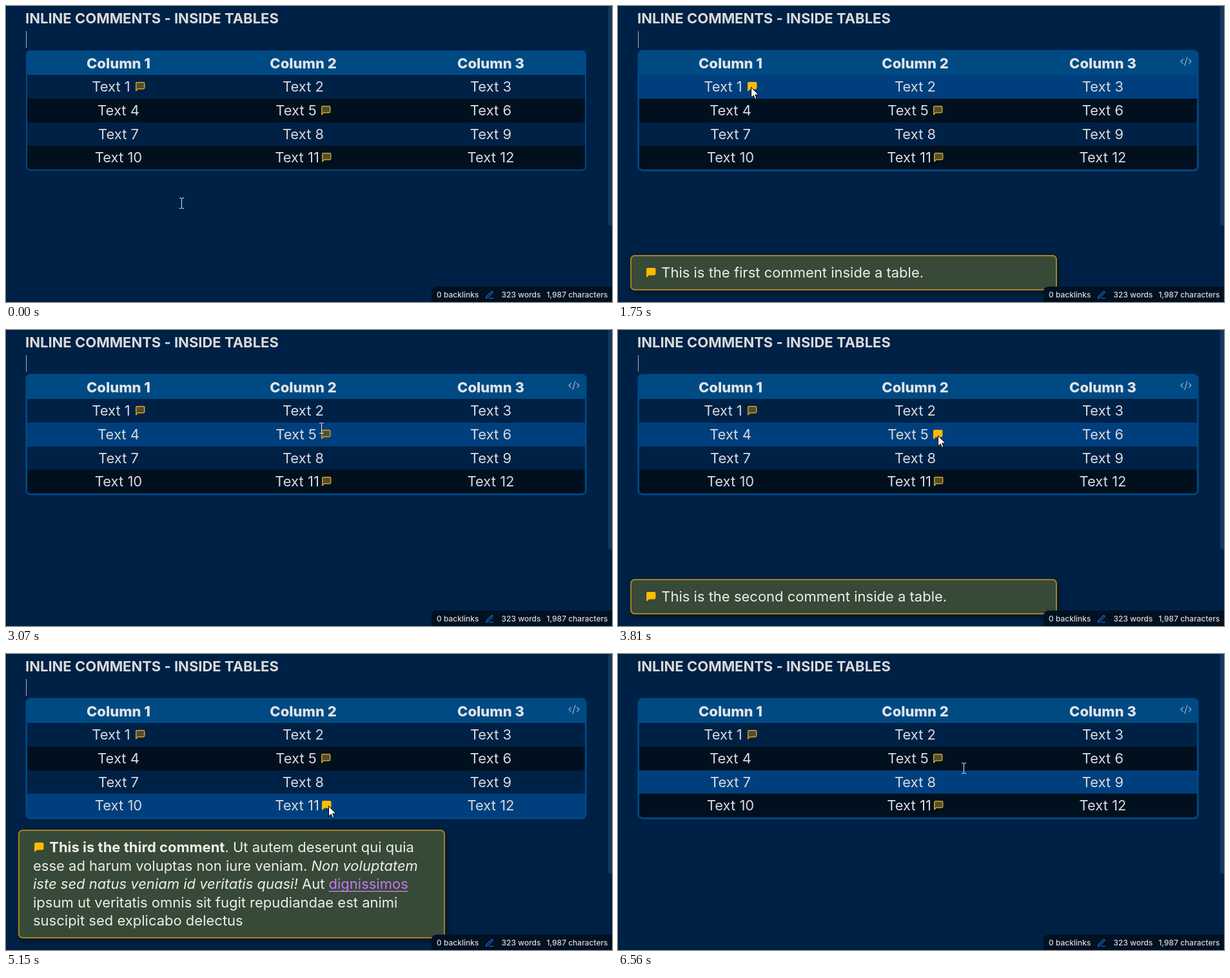
An HTML page with a canvas for the animation above (6.64 s loop, 940 by 460 pixels).

```html
<!DOCTYPE html>
<html lang="en">
<head>
<meta charset="utf-8">
<title>Inline comments</title>
<style>
  html, body { margin: 0; width: 100%; height: 100%; overflow: hidden; background: #002146; }
  canvas { display: block; }
</style>
</head>
<body>
<canvas id="stage" width="940" height="460"></canvas>
<script>
const ctx = document.getElementById('stage').getContext('2d');
const LOOP = 6640;
const BG = '#002146', DARK = '#00101f', HEADER = '#004a84', HOVER = '#003f7e';
const TEXT = '#dadada', GOLD = '#ffba00';
const FAMILY = 'Inter, sans-serif';

const FONTS = {
  normal: `400 22px ${FAMILY}`,
  bold: `700 22px ${FAMILY}`,
  heavy: `800 22px ${FAMILY}`,
  italic: `italic 400 22px ${FAMILY}`,
  link: `400 22px ${FAMILY}`,
  status: `500 12px ${FAMILY}`
};

const COLUMNS = [174.5, 461, 752];
const ROW_EDGES = [107, 144, 181, 217, 254];
const BASELINES = [133, 170, 207, 243];

// Cells with a comment: text start, icon left edge, and the runs of each panel line.
const COMMENTS = [
  { row: 0, col: 0, textX: 133.2, iconX: 201,
    lines: [[['normal', 'This is the first comment inside a table.']]] },
  { row: 1, col: 1, textX: 418.2, iconX: 489,
    lines: [[['normal', 'This is the second comment inside a table.']]] },
  { row: 3, col: 1, textX: 417.3, iconX: 490,
    lines: [
      [['bold', 'This is the third comment'], ['normal', '. Ut autem deserunt qui quia']],
      [['normal', 'esse ad harum voluptas non iure veniam. '], ['italic', 'Non voluptatem']],
      [['italic', 'iste sed natus veniam id veritatis quasi!'], ['normal', ' Aut '], ['link', 'dignissimos']],
      [['normal', 'ipsum ut veritatis omnis sit fugit repudiandae est animi']],
      [['normal', 'suscipit sed explicabo delectus']]
    ] }
];

// Pointer track: time, x, y. The pointer holds between entries.
const TRACK = [
  [0, 272, 306],
  [330, 270, 300], [410, 263, 281], [490, 250, 246], [580, 237, 208],
  [660, 226, 177], [750, 219, 154], [830, 215, 138], [920, 209, 128], [1000, 206, 126],
  [2250, 212, 127], [2330, 238, 130], [2410, 270, 134], [2500, 306, 138], [2580, 345, 141],
  [2660, 382, 144], [2750, 414, 146], [2830, 440, 148], [2910, 462, 149],
  [2990, 478, 150], [3070, 489, 152], [3150, 494, 159], [3230, 496, 163], [3310, 496, 164],
  [4640, 498, 170], [4730, 505, 185], [4810, 509, 199], [4890, 510, 213],
  [4980, 507, 225], [5060, 503, 233], [5150, 500, 236], [5230, 498, 235],
  [6480, 518, 204], [6560, 536, 177]
];

const CARET_TOGGLES = [160, 660, 1250, 1750, 2250, 2750, 3310, 3810, 4390, 4890, 5400, 5980, 6480];

const BUBBLE = new Path2D('M21 15a2 2 0 0 1-2 2H7l-4 4V5a2 2 0 0 1 2-2h14a2 2 0 0 1 2 2z');
const PEN = new Path2D('M12 20h9M16.5 3.5a2.12 2.12 0 0 1 3 3L7 19l-4 1 1-4Z');
const CODE = new Path2D('M18 16l4-4-4-4M6 8l-4 4 4 4M14.5 4l-5 16');
const ARROW = new Path2D('M.5.5V16.5L4.2 13 6.6 18.5 9 17.5 6.7 12H11.7Z');

function rect(x, y, w, h, color) {
  ctx.fillStyle = color;
  ctx.fillRect(x, y, w, h);
}

function roundRect(x, y, w, h, radius) {
  ctx.beginPath();
  ctx.roundRect(x, y, w, h, radius);
}

function text(str, x, y, style, color = TEXT, align = 'left') {
  ctx.font = FONTS[style];
  ctx.textAlign = align;
  ctx.fillStyle = color;
  ctx.fillText(str, x, y);
}

function icon(path, x, y, scale, stroke, fill, weight = 2) {
  ctx.save();
  ctx.translate(x, y);
  ctx.scale(scale, scale);
  ctx.lineWidth = weight;
  ctx.lineCap = ctx.lineJoin = 'round';
  if (fill) {
    ctx.fillStyle = fill;
    ctx.fill(path);
  }
  ctx.strokeStyle = stroke;
  ctx.stroke(path);
  ctx.restore();
}

function bubble(left, baseline, active) {
  icon(BUBBLE, left - 1.4, baseline - 16.5, 0.72,
    active ? GOLD : '#d6a21a', active ? GOLD : '#4f4e35');
}

function overBubble(p, c) {
  const dx = p.x - c.iconX - 7, dy = p.y - BASELINES[c.row] + 8;
  return Math.abs(dx) <= 8 && dy >= -8 && dy <= 14;
}

function drawTable(hover, active) {
  const inside = hover.x > 31 && hover.x < 900 && hover.y > 69 && hover.y < 255;
  if (inside) {
    roundRect(30, 68, 871, 189, 8);
    ctx.fillStyle = '#003c73';
    ctx.fill();
  }
  ctx.save();
  roundRect(31, 69, 869, 187, 7);
  ctx.clip();
  rect(31, 69, 869, 187, BG);
  rect(31, 69, 869, 38, HEADER);
  BASELINES.forEach((_, i) => {
    const top = ROW_EDGES[i], bottom = ROW_EDGES[i + 1];
    const hot = inside && hover.y >= top && hover.y < bottom;
    rect(32, top, 867, bottom - top, hot ? HOVER : i % 2 ? DARK : BG);
  });
  ctx.restore();
  roundRect(32, 70, 867, 185, 6);
  ctx.lineWidth = 2;
  ctx.strokeStyle = HEADER;
  ctx.stroke();

  COLUMNS.forEach((x, col) => {
    text(`Column ${col + 1}`, x, 97, 'heavy', '#e2e4e6', 'center');
    BASELINES.forEach((y, row) => {
      const label = `Text ${row * 3 + col + 1}`;
      const comment = COMMENTS.find(c => c.row === row && c.col === col);
      if (comment) {
        text(label, comment.textX, y, 'normal');
        bubble(comment.iconX, y, comment === active);
      } else {
        text(label, x, y, 'normal', TEXT, 'center');
      }
    });
  });
  if (inside) icon(CODE, 871.4, 76.6, 0.8, '#a3b5c8', null, 1.5);
}

function drawPanel(lines) {
  const last = lines.length - 1;
  const top = 387 - 28.5 * last;
  ctx.save();
  ctx.shadowColor = 'rgba(0, 0, 0, .4)';
  ctx.shadowBlur = 8;
  ctx.shadowOffsetX = 3;
  ctx.shadowOffsetY = 5;
  roundRect(19, top, 662, 55, 7);
  ctx.beginPath();
  ctx.roundRect(19, top, 662, 442 - top, 7);
  ctx.fillStyle = '#374937';
  ctx.fill();
  ctx.restore();
  roundRect(20, top + 1, 660, 440 - top, 6);
  ctx.lineWidth = 2;
  ctx.strokeStyle = '#a58419';
  ctx.stroke();

  lines.forEach((runs, i) => {
    const y = Math.round(422 - 28.5 * (last - i));
    let x = i ? 42 : 67.2;
    if (!i) bubble(44, y, true);
    for (const [style, str] of runs) {
      const color = style === 'link' ? '#c678f5' : '#eceeec';
      text(str, x, y, style, color);
      const width = ctx.measureText(str).width;
      if (style === 'link') rect(x, y + 3, width, 1.5, color);
      x += width;
    }
  });
}

function drawStatusBar() {
  roundRect(660, 436, 290, 34, [8, 0, 0, 0]);
  ctx.fillStyle = '#001122';
  ctx.fill();
  text('0 backlinks', 668, 453, 'status');
  icon(PEN, 742.6, 441.8, 0.62, '#1769c9');
  text('323 words', 768.5, 453, 'status');
  text('1,987 characters', 838.5, 453, 'status');
}

function drawPointer(p, arrow) {
  if (arrow) {
    icon(ARROW, p.x, p.y, 1, '#000', '#fff', 1);
    return;
  }
  rect(p.x, p.y - 7, 1, 15, '#e4e6e8');
  for (const y of [p.y - 8, p.y + 8]) {
    rect(p.x - 3, y, 3, 1, '#e4e6e8');
    rect(p.x + 1, y, 3, 1, '#e4e6e8');
  }
}

function pointAt(index) {
  const [, x, y] = TRACK[Math.max(0, index)];
  return { x, y };
}

function draw(t) {
  const step = TRACK.filter(k => k[0] <= t).length - 1;
  const pointer = pointAt(step);
  // Hover styles follow the pointer one step late.
  const hover = pointAt(step - 1);
  const active = COMMENTS.find(c => overBubble(hover, c));
  const caretOn = CARET_TOGGLES.filter(k => k <= t).length % 2 === 0;

  rect(0, 0, 940, 460, BG);
  text('INLINE COMMENTS - INSIDE TABLES', 30, 27, 'bold');
  if (caretOn) rect(31, 39, 1, 26, '#a2abb6');
  drawTable(hover, active);
  roundRect(934, -6, 8, 347, 3);
  ctx.fillStyle = '#17375a';
  ctx.fill();
  if (active) drawPanel(active.lines);
  drawStatusBar();
  drawPointer(pointer, COMMENTS.some(c => overBubble(pointer, c)));
}

const start = performance.now();
function frame() {
  draw((performance.now() - start) % LOOP);
  requestAnimationFrame(frame);
}
frame();
</script>
</body>
</html>
```
